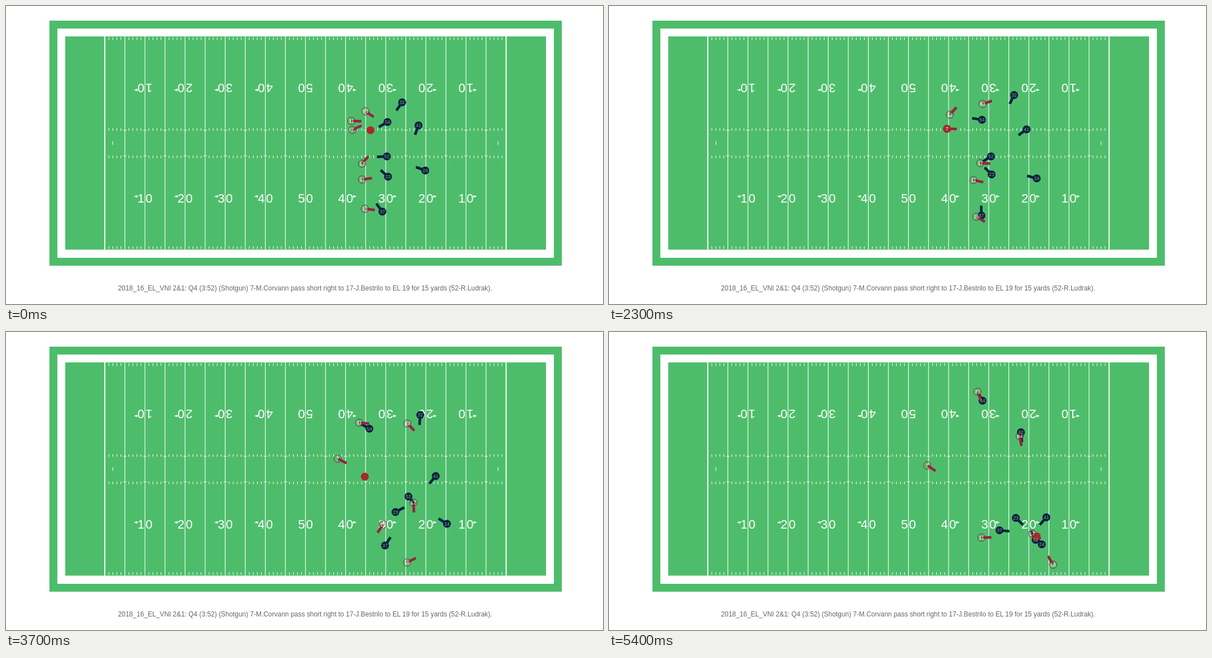
An HTML page that plays this animation: 1058x529 px, repeating every 5500 ms.

```html
<!DOCTYPE html>
<html lang="en">
<head>
<meta charset="utf-8">
<title>Play animation</title>
<style>
  html, body { margin: 0; width: 100%; height: 100%; overflow: hidden; background: #fff; }
  svg { display: block; width: 100%; height: 100%; }
  text { font-family: "Liberation Sans", Arial, sans-serif; text-anchor: middle; }
  .yards text { font-size: 22px; fill: #fff; }
  .num { font-size: 8.5px; }
</style>
</head>
<body>
<svg id="stage" viewBox="0 0 1058 529">
  <rect width="1058" height="529" fill="#fff"/>
  <rect x="77" y="26" width="908" height="435" fill="#4ebd6b"/>
  <rect x="91" y="40" width="880" height="407" fill="#fff"/>
  <rect x="105" y="54" width="852" height="378.5" fill="#4ebd6b"/>
  <text x="530" y="505" font-size="11.9" fill="#666">2018_16_EL_VNI 2&amp;1: Q4 (3:52) (Shotgun) 7-M.Corvann pass short right to 17-J.Bestrilo to EL 19 for 15 yards (52-R.Ludrak).</text>
</svg>
<script>
const STEP = 100, COUNT = 55;
const SNAP = 11, THROW = 33, CATCH = 47;
const KEYS = [10, 23, 31, 42, 54];
const NAVY = '#002244', GOLD = '#b3995d', RED = '#97233f';
const stage = document.getElementById('stage');

function add(parent, tag, attrs, label) {
  const el = document.createElementNS('http://www.w3.org/2000/svg', tag);
  for (const k in attrs) el.setAttribute(k, attrs[k]);
  if (label !== undefined) el.textContent = label;
  return parent.appendChild(el);
}

const yardX = yard => 530.7 + (yard - 50) * 7.112;

function drawField() {
  let lines = '', goals = '', ticks = '';
  const bar = (x, top, bottom) => `M${x.toFixed(2)} ${top}V${bottom}`;
  for (let yard = 0; yard <= 100; yard++) {
    const x = yardX(yard);
    if (yard % 100 === 0) {
      goals += bar(x, 54, 432.5);
    } else if (yard % 5 === 0) {
      lines += bar(x, 54, 432.5);
      for (const y of [220.5, 266]) ticks += `M${x - 3} ${y}h6`;
    } else {
      for (const y of [55.5, 217, 265.5, 426.5]) ticks += bar(x, y, y + 4.6);
    }
  }
  for (const yard of [2, 98]) ticks += bar(yardX(yard), 240, 246.5);
  add(stage, 'path', { d: lines, stroke: '#fff', 'stroke-width': 1.1 });
  add(stage, 'path', { d: goals, stroke: '#fff', 'stroke-width': 1.9 });
  add(stage, 'path', { d: ticks, stroke: '#fff', 'stroke-width': 1 });

  const yards = add(stage, 'g', { class: 'yards' });
  for (let yard = 10; yard <= 90; yard += 10) {
    const value = String(Math.min(yard, 100 - yard));
    for (const [y, turn] of [[341, 0], [146, 180]]) {
      const g = add(yards, 'g', { transform: `translate(${yardX(yard)} ${y}) rotate(${turn})` });
      add(g, 'text', { x: -7.2, y: 7.8 }, value[0]);
      add(g, 'text', { x: 7.2, y: 7.8 }, value[1]);
      const side = Math.sign(yard - 50) * (turn ? -1 : 1);
      if (side) add(g, 'path', { d: `M${side * 19.6} -3L${side * 13.2} -5.2V-0.8Z`, fill: '#fff' });
    }
  }
}

const mix = (a, b, u) => a + (b - a) * u;
const mixPoint = (p, q, u) => [mix(p[0], q[0], u), mix(p[1], q[1], u)];
const ramp = (f, from, to) => Math.min(1, Math.max(0, (f - from) / (to - from)));
const ease = u => u * u * (3 - 2 * u);
const heading = (dx, dy) => Math.atan2(dy, dx) * 180 / Math.PI;
// Turn from one heading to another the short way round
const turn = (a, b, u) => a + ((((b - a) % 360) + 540) % 360 - 180) * u;

// Stand still until the first key, then follow a smooth curve through the points
function along(path, f) {
  if (f <= KEYS[0]) return path[0];
  const last = KEYS.length - 1;
  let i = 0;
  while (i < last - 1 && f >= KEYS[i + 1]) i++;
  const h = KEYS[i + 1] - KEYS[i], u = (f - KEYS[i]) / h;
  return [0, 1].map(axis => {
    const slope = k => {
      if (k === 0) return 0;
      const b = Math.min(k + 1, last);
      return (path[b][axis] - path[k - 1][axis]) / (KEYS[b] - KEYS[k - 1]);
    };
    return mix(path[i][axis], path[i + 1][axis], ease(u))
      + h * u * (1 - u) * ((1 - u) * slope(i) - u * slope(i + 1));
  });
}

drawField();
const defence = add(stage, 'g', {});
const offence = add(stage, 'g', {});
const ball = add(stage, 'circle', { r: 7, fill: '#a52a2a' });
const labels = add(stage, 'g', {});
const players = [];

// A defender watches the opponent given as mark
function player(team, number, stance, path, mark) {
  const body = add(team, 'g', {});
  const facing = add(body, 'path', {
    d: 'M0 0H17.6', stroke: mark ? NAVY : RED, 'stroke-width': 4.6
  });
  add(body, 'circle', mark
    ? { r: 7, fill: NAVY }
    : { r: 6.7, fill: 'none', stroke: RED, 'stroke-width': 1 });
  const label = add(labels, 'text', { class: 'num', y: 3.1, fill: mark ? GOLD : '#fff' }, number);
  const p = { stance, path, mark, body, facing, label };
  players.push(p);
  return p;
}

player(offence, 84, 34, [[637, 187], [662, 174], [695, 161], [721, 167], [728, 185]]);
player(offence, 11, -8, [[631, 308], [646, 309], [667, 322], [666, 356], [660, 365]]);
player(offence, 16, 7, [[636, 360], [651, 374], [679, 399], [737, 414], [787, 413]]);
const back = player(offence, 31, 2, [[612, 204], [604, 193], [610, 175], [639, 148], [653, 106]]);
const passer = player(offence, 7, -26, [[614, 220], [599, 218], [590, 222], [585, 228], [564, 237]]);
const catcher = player(offence, 17, -50, [[631, 280], [658, 279], [697, 285], [738, 320], [750, 358]]);
player(defence, 32, 125, [[702, 171], [718, 158], [733, 143], [733, 155], [730, 178]], catcher);
player(defence, 54, 150, [[676, 206], [661, 202], [646, 184], [646, 160], [662, 122]], back);
player(defence, 41, 110, [[731, 212], [740, 219], [751, 236], [769, 275], [775, 329]], catcher);
player(defence, 52, 177, [[675, 267], [677, 267], [694, 276], [729, 310], [756, 369]], catcher);
player(defence, 23, 222, [[677, 303], [678, 299], [684, 305], [697, 330], [721, 330]], catcher);
player(defence, 24, 200, [[743, 292], [758, 306], [772, 321], [785, 356], [767, 377]], catcher);
player(defence, 37, 233, [[667, 365], [660, 372], [670, 386], [674, 370], [692, 352]], catcher);

// Snap to the passer, drop back, throw to the catcher, carry
function ballAt(f) {
  const held = mixPoint([646, 220.5], along(passer.path, Math.min(f, THROW)), ramp(f, SNAP, SNAP + 7));
  const [x, y] = along(catcher.path, Math.max(f, CATCH));
  return mixPoint(held, [x + 8, y + 5], ramp(f, THROW, CATCH));
}

function facingAt(p, f, [x, y], [bx, by]) {
  let look;
  if (p.mark) {
    const [mx, my] = along(p.mark.path, f);
    look = heading(mx - x, my - y);
  } else {
    // Face downfield along the run, then follow the thrown ball
    const [px, py] = along(p.path, f - 1);
    const run = heading(Math.abs(x - px) + 1, y - py);
    look = turn(run, heading(bx - x, by - y), ease(ramp(f, THROW, THROW + 11)));
  }
  return turn(p.stance, look, ease(ramp(f, 8, 18)));
}

function draw(ms) {
  const f = Math.floor(ms / STEP) % COUNT;
  const spot = ballAt(f);
  ball.setAttribute('cx', spot[0]);
  ball.setAttribute('cy', spot[1]);
  for (const p of players) {
    const at = along(p.path, f);
    const place = `translate(${at[0].toFixed(2)} ${at[1].toFixed(2)})`;
    p.body.setAttribute('transform', place);
    p.label.setAttribute('transform', place);
    p.facing.setAttribute('transform', `rotate(${facingAt(p, f, at, spot).toFixed(1)})`);
  }
}

let start;
function tick(now) {
  if (start === undefined) start = now;
  draw(now - start);
  requestAnimationFrame(tick);
}
draw(0);
requestAnimationFrame(tick);
</script>
</body>
</html>
```
